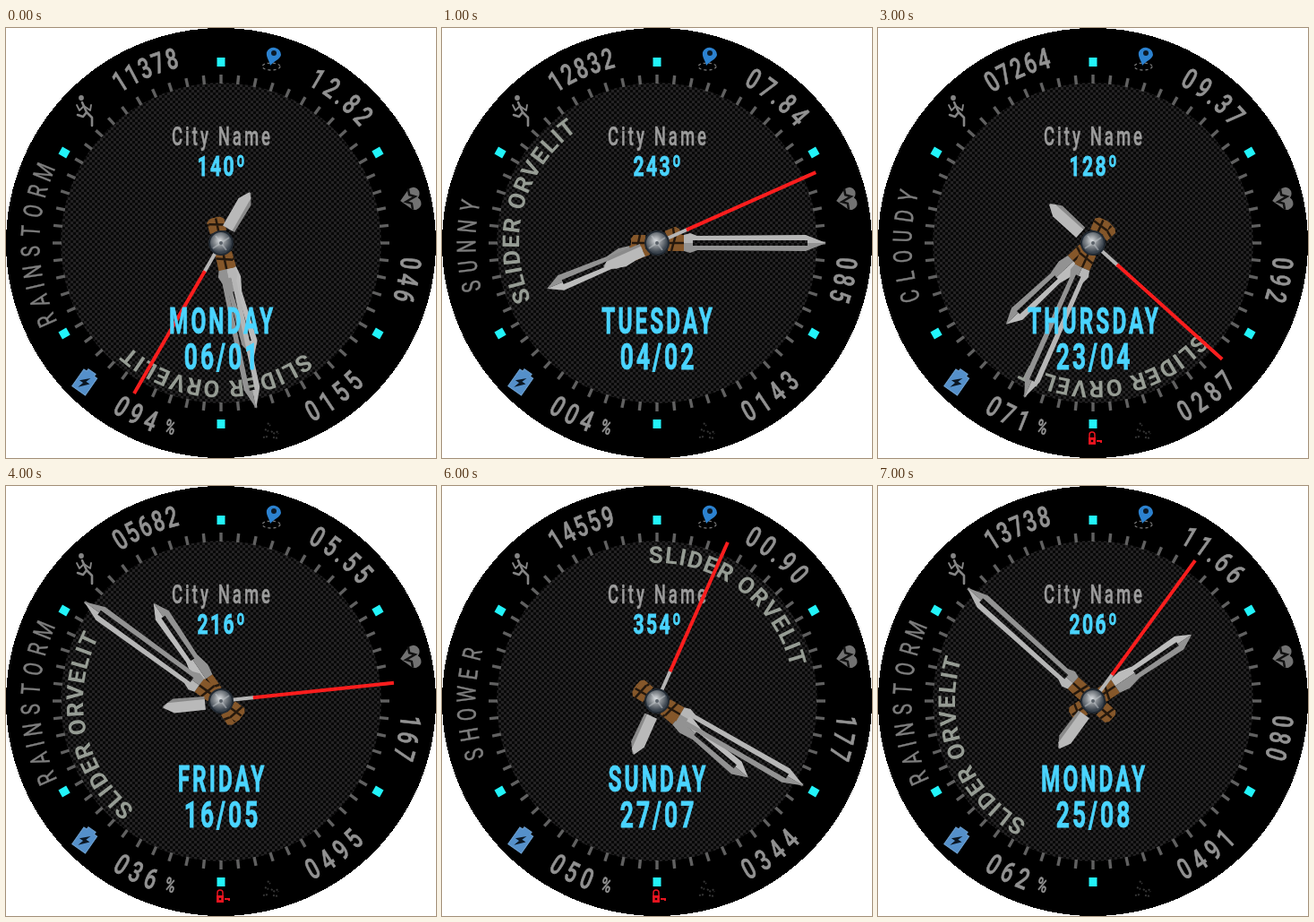
Write an HTML page that moves like this. It is 480 px wide and 480 px high and loops after 8000 ms.

```html
<!DOCTYPE html>
<html lang="en">
<head>
<meta charset="utf-8">
<title>Watch face</title>
<style>
  html, body { margin: 0; width: 100%; height: 100%; overflow: hidden; background: #fff; }
  svg { display: block; width: 480px; height: 480px; }
  text { font-family: Roboto, "Open Sans", sans-serif; text-anchor: middle; }
  .big { fill: #4ad4ff; stroke: #4ad4ff; stroke-width: .9px; font-weight: 700; }
  .city { fill: #9c9c9c; stroke: #9c9c9c; stroke-width: .5px; font-weight: 500; }
  .num { fill: #929292; stroke: #929292; stroke-width: .7px; font-weight: 500; }
  .sky { fill: #7e7e7e; stroke: #7e7e7e; stroke-width: .5px; font-weight: 400; }
  .bezel { fill: #969c94; font-weight: 700; font-size: 26px; letter-spacing: 1.3px; text-anchor: start; }
</style>
</head>
<body>
<svg viewBox="0 0 480 480">
  <defs>
    <pattern id="carbon" width="6" height="6" patternUnits="userSpaceOnUse">
      <rect width="6" height="6" fill="#080808"/>
      <path d="M0 0h3v3h-3zM3 3h3v3h-3z" fill="#242324"/>
    </pattern>
    <radialGradient id="steel" cx=".45" cy=".4">
      <stop offset="0" stop-color="#dcdfe2"/>
      <stop offset=".5" stop-color="#868b90"/>
      <stop offset="1" stop-color="#3b444e"/>
    </radialGradient>
    <path id="track" d="M240 86a154 154 0 0 1 0 308a154 154 0 0 1 0-308"/>

    <!-- Hands point up from the origin -->
    <g id="hilt">
      <path d="M-9-30V-12H9V-30ZM-9 13V26L-5 29H5L9 26V13Z" fill="#85572a"/>
      <path d="M-9-21L9-16M-9 19L9 23M0-30V28" stroke="#24180d" stroke-width="2.5"/>
    </g>
    <g id="hour">
      <use href="#hilt"/>
      <path d="M0-133L-9-116-7.500-58-11-42-9-30H0V-56H-2.500V-114H0Z" fill="#bcbcbc"/>
      <path d="M0-133L9-116 7.500-58 11-42 9-30H0V-56H2.500V-114H0Z" fill="#929292"/>
    </g>
    <g id="minute">
      <use href="#hilt"/>
      <path d="M0-189L-9-166-8-45-11-37-9-30H0V-40H-3V-168H0Z" fill="#b6b6b6"/>
      <path d="M0-189L9-166 8-45 11-37 9-30H0V-40H3V-168H0Z" fill="#929292"/>
    </g>
    <g id="second">
      <path d="M-7 18L-8 53-1 65 1 65V18Z" fill="#8a8a8a"/>
      <path d="M8 18L8 53 1 65-4 60V18Z" fill="#b9b9b9"/>
      <path d="M0 0V-38" stroke="#b5b5b5" stroke-width="4"/>
      <path d="M0-36V-194" stroke="#fb1d1d" stroke-width="4"/>
    </g>
  </defs>

  <circle cx="240" cy="240" r="240" shape-rendering="crispEdges"/>
  <circle cx="240" cy="240" r="179" fill="url(#carbon)"/>
  <g id="marks"></g>

  <g id="runner" fill="none" stroke="#858585" stroke-width="2.600" stroke-linecap="round" stroke-linejoin="round">
    <circle cx="84" cy="78" r="1.600" fill="#858585"/>
    <path d="M85 83L90 94L96 100L96 109M90 94L86 99L80 97"/>
    <path d="M79 86L82 92L87 87L94 92L95 86" stroke-width="1.800"/>
  </g>
  <g id="pin">
    <ellipse cx="296" cy="43" rx="10" ry="4" fill="none" stroke="#777" stroke-width="1.300" stroke-dasharray="3 3"/>
    <path d="M295 42C294 36 290 33 291 27A8.300 8.300 0 0 1 307 30C306 35 299 37 295 42Z" fill="#2c82d0"/>
    <circle cx="299" cy="28" r="3" fill="#0c1a28"/>
  </g>
  <g id="pulse" transform="translate(452 191) rotate(80)">
    <path d="M0 12L-11 1A6.600 6.600 0 0 1 0-8A6.600 6.600 0 0 1 11 1Z" fill="#727272"/>
    <path d="M-12 1H-5L-2-5L2 6L5 0H12" fill="none" stroke="#111" stroke-width="2.500"/>
  </g>
  <g id="battery" transform="translate(88 395) rotate(35)">
    <path d="M-5-14H5V-11H9V12H-9V-11H-5Z" fill="#5590ca" stroke="#6fa2d2"/>
    <path d="M3-7L-6 2H-1L-3 9L6-1H1Z" fill="#0b1622"/>
  </g>
  <path d="M292 441l3 3M289 448l4 2M287 457l5-1M296 450l4 3M298 457l6 1M302 450l2 3" stroke="#353535" stroke-width="2" stroke-dasharray="2 1"/>

  <g id="live"></g>
</svg>
<script>
const CENTER = 'translate(240 240)';

// h, m, s, heading, day, date, weather, steps, distance, pulse, calories, battery, locked
const states = [
  [5, 28, 35, 140, 'MONDAY', '06/01', 'RAINSTORM', '11378', '12.82', '046', '0155', '094', 0],
  [8, 15, 11, 243, 'TUESDAY', '04/02', 'SUNNY', '12832', '07.84', '085', '0143', '004', 0],
  [0, 48, 40, 71, 'WEDNESDAY', '12/03', 'TH. SHOWER', '09599', '01.98', '106', '0466', '095', 1],
  [7, 34, 22, 128, 'THURSDAY', '23/04', 'CLOUDY', '07264', '09.37', '092', '0287', '071', 1],
  [10, 51, 14, 216, 'FRIDAY', '16/05', 'RAINSTORM', '05682', '05.55', '167', '0495', '036', 1],
  [2, 38, 49, 287, 'SATURDAY', '21/06', 'CLOUDY', '10845', '03.26', '124', '0238', '083', 0],
  [4, 20, 4, 354, 'SUNDAY', '27/07', 'SHOWER', '14559', '00.90', '177', '0344', '050', 1],
  [1, 52, 6, 206, 'MONDAY', '25/08', 'RAINSTORM', '13738', '11.66', '080', '0491', '062', 0]
];

const lock = `<g fill="#e8141f">
  <path d="M235 457h8v8h-8z"/>
  <path d="M236 457v-3a3 3 0 0 1 6 0v3" fill="none" stroke="#e8141f" stroke-width="1.500"/>
  <path d="M244 460h6v3h-2v-1h-4z"/><circle cx="239" cy="461" r="1.300" fill="#000"/></g>`;

// Centred line of condensed type
const line = (str, y, size, squeeze, gap, cls) =>
  `<text class="${cls}" font-size="${size}" letter-spacing="${gap}"
    transform="translate(${240 + gap * squeeze / 2} ${y}) scale(${squeeze} 1)">${str}</text>`;

const share = ch => '. I'.includes(ch) ? 0.5 : 1;

// Characters spread round the dial; flip puts their feet outwards
function ring(str, angle, step, size, cls, flip = false) {
  const dir = flip ? -1 : 1;
  const total = [...str].reduce((sum, ch) => sum + share(ch), 0);
  let at = -total / 2;
  return [...str].map(ch => {
    const a = angle + dir * step * (at + share(ch) / 2);
    at += share(ch);
    return `<text class="${cls}" font-size="${size}" y="${size * 0.355}"
      transform="${CENTER} rotate(${a}) translate(0 -213) rotate(${flip ? 180 : 0}) scale(.72 1)">${ch}</text>`;
  }).join('');
}

const hand = (id, angle) => `<use href="#${id}" transform="${CENTER} rotate(${angle})"/>`;

function face([h, m, s, heading, day, date, sky, steps, dist, pulse, kcal, power, locked]) {
  return ring(steps, 336.5, 4.25, 32, 'num')
    + ring(dist, 39.4, 5.1, 32, 'num')
    + ring(pulse, 101.2, 5, 32, 'num')
    + ring(kcal, 143.7, 5.1, 32, 'num', true)
    + ring(power, 206.4, 4.85, 32, 'num', true)
    + ring('%', 195.4, 0, 22, 'num', true)
    + ring(sky, 269, 6.1, 29, 'sky')
    + `<text class="bezel" transform="rotate(${heading} 240 240)"><textPath href="#track" startOffset="7">SLIDER ORVELIT</textPath></text>`
    + line('City Name', 131, 29, 0.64, 4.7, 'city')
    + hand('hour', h * 30 + m / 2)
    + hand('minute', m * 6)
    + hand('second', s * 6)
    + `<circle cx="240" cy="240" r="13" fill="url(#steel)" stroke="#222a33" stroke-width="2"/>
       <path d="M231 246L249 234M234 232L246 248" stroke="#c9ced3" stroke-opacity=".45" stroke-width="2"/>
       <circle cx="240" cy="240" r="2" fill="#5b626a"/>`
    + line(heading.toString().padStart(3, '0') + 'º', 165, 32, 0.66, 3.6, 'big')
    + line(day, 341, 40, 0.61, 5, 'big')
    + line(date, 381, 40, 0.66, 4.6, 'big')
    + (locked ? lock : '');
}

let marks = '';
for (let a = 0; a < 360; a += 6) {
  marks += `<path d="M0-178V-188" stroke="#606060" stroke-width="3.4" transform="${CENTER} rotate(${a})"/>`;
  if (a % 60 === 0) marks += `<path d="M-4.5-207h9v10h-9z" fill="#22f4fa" transform="${CENTER} rotate(${a})"/>`;
}
document.getElementById('marks').innerHTML = marks;

const live = document.getElementById('live');
let shown = -1;
function tick() {
  const i = Math.floor(performance.now() / 1000) % states.length;
  if (i !== shown) live.innerHTML = face(states[shown = i]);
  requestAnimationFrame(tick);
}
tick();
</script>
</body>
</html>
```
